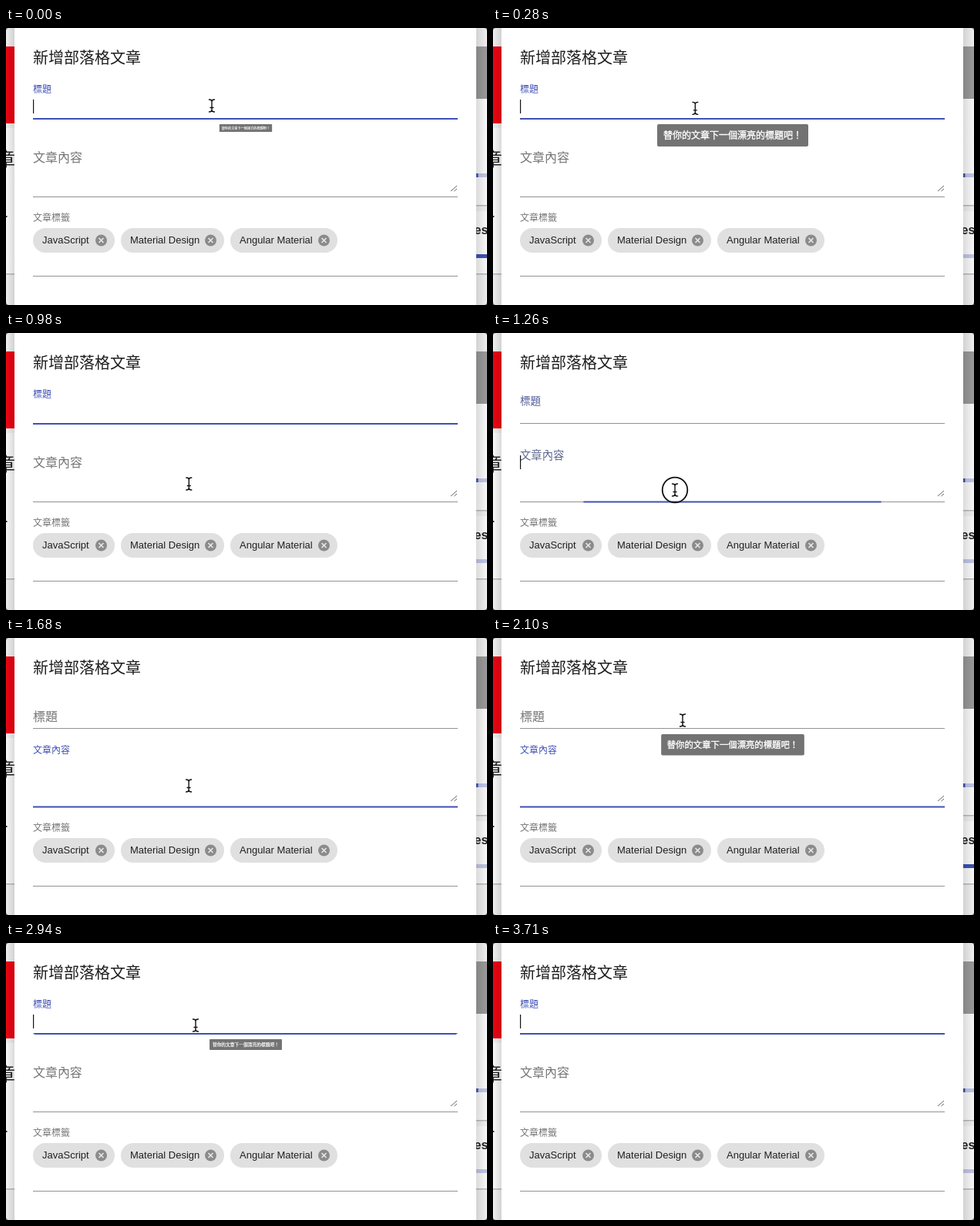
Animation, 624 px wide and 360 px high, one loop 3850 ms. Source, as an HTML page:

```html
<!DOCTYPE html>
<html lang="zh-Hant">
<head>
<meta charset="utf-8">
<style>
html, body { margin: 0; width: 100%; height: 100%; overflow: hidden; background: #f1f1f1; }
svg { display: block; width: 624px; height: 360px; }
text { font-family: "Noto Sans CJK TC", "Noto Sans CJK", sans-serif; white-space: pre; }
.chip text, .latin { font-family: "Liberation Sans", Arial, sans-serif; }
.chip text { font-size: 13px; fill: #202020; }
</style>
</head>
<body>
<svg viewBox="0 0 624 360">
  <defs>
    <linearGradient id="shadeL"><stop offset="0" stop-opacity=".01"/><stop offset="1" stop-opacity=".13"/></linearGradient>
    <linearGradient id="shadeR"><stop offset="0" stop-opacity=".13"/><stop offset="1" stop-opacity=".01"/></linearGradient>
  </defs>

  <!-- page behind the dialog -->
  <rect width="624" height="360" fill="#f1f1f1"/>
  <rect y="24" width="11" height="100" fill="#ec0512"/>
  <rect y="130" width="11" height="189" fill="#fbfbfb"/>
  <rect y="319" width="11" height="1.5" fill="#b8b8b8"/>
  <text x="-12" y="179" font-size="24" fill="#222">章</text>
  <rect y="244" width="1.5" height="2" fill="#333"/>
  <rect x="610" y="24" width="14" height="68" fill="#9a9a9a"/>
  <rect x="610" y="92" width="14" height="138" fill="#fbfbfb"/>
  <rect x="610" y="189" width="14" height="5" fill="#c2c7e8"/>
  <rect x="610" y="189" width="2.5" height="5" fill="#3f51b5"/>
  <rect x="610" y="230" width="14" height="1.5" fill="#b8b8b8"/>
  <rect x="610" y="238" width="14" height="81" fill="#fbfbfb"/>
  <text class="latin" x="607.5" y="268" font-size="16" font-weight="700" fill="#222">es</text>
  <rect id="bar" x="610" y="294" width="14" height="5"/>
  <rect x="610" y="319" width="14" height="1.5" fill="#b8b8b8"/>
  <rect width="11" height="360" fill="url(#shadeL)"/>
  <rect x="610" width="14" height="360" fill="url(#shadeR)"/>
  <path d="M0 360v-4q0 4 4 4zM624 360v-4q0 4-4 4zM0 0h4q-4 0-4 4zM624 0h-4q4 0 4 4z" fill="#555"/>

  <!-- dialog -->
  <rect x="11" width="599" height="360" fill="#fff"/>
  <text x="35" y="45.5" font-size="20" font-weight="500" fill="#1c1c1c">新增部落格文章</text>
  <path d="M35 117.5H586M35 219.5H586M35 322.5H586" stroke="#929292"/>
  <path d="M577 212l8-7M581.5 212l3.5-3" stroke="#666" fill="none"/>
  <text x="35" y="250.6" font-size="12" fill="#757575">文章標籤</text>
  <g id="chips"></g>
  <text id="label0" y="6" font-size="16">標題</text>
  <text id="label1" y="6" font-size="16">文章內容</text>
  <rect id="line0" y="117" height="2" fill="#3f51b5"/>
  <rect id="line1" y="218.5" height="2" fill="#3f51b5"/>
  <rect id="caret" x="35" width="1.2" height="18" fill="#111"/>
  <g id="tip">
    <rect x="-98" width="196" height="29" rx="2" fill="#737373"/>
    <text x="-90" y="19.4" font-size="12" fill="#fff" stroke="#fff" stroke-width=".35">替你的文章下一個漂亮的標題吧！</text>
  </g>
  <g id="cursor">
    <circle id="ring" r="16.3" fill="none" stroke="#111" stroke-width="1.8"/>
    <g id="beam" fill="none" stroke-linecap="round">
      <path d="M-3.5-8Q0-8 0-5.5Q0-8 3.5-8M0-5.5V5.5M-3.5 8Q0 8 0 5.5Q0 8 3.5 8M-2 2.5H2" stroke="#fff" stroke-width="3"/>
      <path d="M-3.5-8Q0-8 0-5.5Q0-8 3.5-8M0-5.5V5.5M-3.5 8Q0 8 0 5.5Q0 8 3.5 8M-2 2.5H2" stroke="#111" stroke-width="1.4"/>
    </g>
    <path id="arrow" d="M0 0V14.2L3.3 11.2L5.8 17L8.2 16L5.7 10.3H10.2Z" fill="#111" stroke="#fff"/>
  </g>
</svg>
<script>
const LOOP = 3850, STEP = 70;
const $ = id => document.getElementById(id);
const set = (id, attrs) => { for (const k in attrs) $(id).setAttribute(k, attrs[k]); };
const show = (id, on) => set(id, { visibility: on ? 'inherit' : 'hidden' });
const mix = (a, b, p) => a + (b - a) * p;
const clamp = v => Math.max(0, Math.min(1, v));
const within = (t, spans) => spans.some(([a, b]) => t >= a && t < b);

function bezier(x1, y1, x2, y2) {
  const at = (a, b, u) => 3 * a * u * (1 - u) ** 2 + 3 * b * u * u * (1 - u) + u ** 3;
  return x => {
    if (x <= 0 || x >= 1) return clamp(x);
    let lo = 0, hi = 1;
    for (let i = 0; i < 25; i++) {
      const mid = (lo + hi) / 2;
      if (at(x1, x2, mid) < x) lo = mid; else hi = mid;
    }
    return at(y1, y2, lo);
  };
}
const floatEase = bezier(.25, .8, .25, 1);
const growEase = bezier(0, 0, .2, 1);
const shrinkEase = bezier(.4, 0, 1, 1);

const TO_BODY = 1210, TO_TITLE = 2644;
const CARETS = [
  [[0, 560], [TO_TITLE, 3150], [3710, LOOP]],
  [[TO_BODY - 20, 1680], [2310, TO_TITLE]]
];
const LIGHT_BAR = [[280, 560], [840, 1750], [2310, 2590], [2800, LOOP]];
const CLICKS = [[1120, 1330], [2590, 2800]];
const TIPS = [[-18, 690], [1995, 2840]];
// time, x, y
const PATH = [
  [0, 267, 101], [420, 260, 106], [520, 260, 106], [700, 248, 141], [840, 240, 180],
  [1050, 236, 204], [1640, 236, 204], [1820, 241, 150], [1960, 246, 107],
  [3080, 246, 107], [3150, 295, 283]
];

function cursorAt(t) {
  const i = PATH.findIndex(p => p[0] > t);
  if (i < 0) return PATH[PATH.length - 1].slice(1);
  const a = PATH[i - 1], b = PATH[i], p = (t - a[0]) / (b[0] - a[0]);
  return [mix(a[1], b[1], p), mix(a[2], b[2], p)];
}

function tipScale(t) {
  const span = TIPS.find(([a, b]) => t >= a && t < b + 150);
  if (!span) return 0;
  return growEase(clamp((t - span[0]) / 150)) * (1 - shrinkEase(clamp((t - span[1]) / 150)));
}

// p: 0 resting in the field, 1 floated above it
function drawField(i, p, focused) {
  const y = i ? mix(168, 145, p) : mix(102, 79, p);
  const rgb = [mix(117, 63, p), mix(117, 81, p), mix(117, 181, p)].map(Math.round);
  set('label' + i, { transform: `translate(35 ${y}) scale(${mix(1, .75, p)})`, fill: `rgb(${rgb})` });
  const w = 551 * mix(.5, 1, p);
  set('line' + i, { x: 310.5 - w / 2, width: w });
  show('line' + i, focused);
}

function draw(t) {
  const toBody = floatEase(clamp((t - TO_BODY) / 400));
  const toTitle = floatEase(clamp((t - TO_TITLE) / 400));
  const body = toBody - toTitle;
  const bodyFocus = t >= TO_BODY && t < TO_TITLE;
  drawField(0, 1 - body, !bodyFocus);
  drawField(1, body, bodyFocus);

  const inTitle = within(t, CARETS[0]);
  set('caret', { y: inTitle ? 93 : 159 });
  show('caret', inTitle || within(t, CARETS[1]));

  const scale = tipScale(t);
  set('tip', { transform: `translate(311 125) scale(${scale})` });
  show('tip', scale > 0);

  const [x, y] = cursorAt(t);
  const isBeam = (y > 90 && y < 121) || (y > 155 && y < 216);
  set('cursor', { transform: `translate(${x} ${y})` });
  show('cursor', t < 3220);
  show('beam', isBeam);
  show('arrow', !isBeam);
  show('ring', within(t, CLICKS));

  set('bar', { fill: within(t, LIGHT_BAR) ? '#c2c7e8' : '#3f51b5' });
}

$('chips').innerHTML = [['JavaScript', 35, 106], ['Material Design', 149, 134], ['Angular Material', 291, 139]]
  .map(([name, x, w]) => `<g class="chip" transform="translate(${x} 260)">
    <rect width="${w}" height="32" rx="16" fill="#e0e0e0"/>
    <text x="12" y="20">${name}</text>
    <g transform="translate(${w - 17.5} 16)"><circle r="7.5" fill="#8b8b8b"/>
    <path d="M-3-3L3 3M3-3L-3 3" stroke="#e8e8e8" stroke-width="1.6"/></g></g>`).join('');

const start = performance.now();
function tick() {
  const t = (performance.now() - start) % LOOP;
  draw(Math.floor(t / STEP) * STEP);
  requestAnimationFrame(tick);
}
draw(0);
requestAnimationFrame(tick);
</script>
</body>
</html>
```
